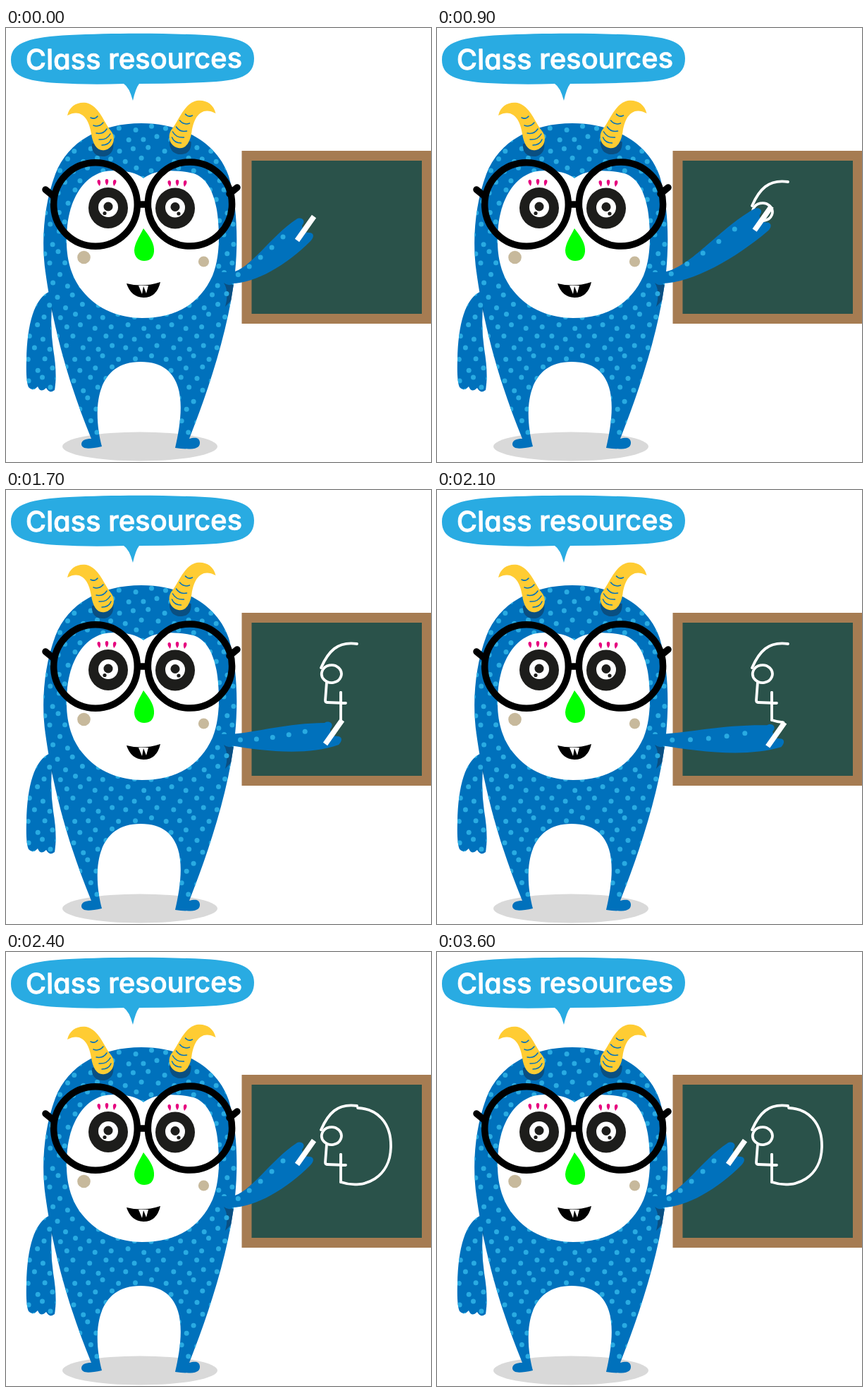
Animation, 603 px wide and 615 px high, one loop 5.6 s. Source, as an HTML page:

```html
<!DOCTYPE html>
<html lang="en">
<head>
<meta charset="utf-8">
<title>Class resources</title>
<style>
  html, body { margin: 0; width: 100%; height: 100%; overflow: hidden; background: #fff; }
  svg { display: block; width: 603px; height: 615px; }
  .fur { fill: #0071bc; }
  .dots { fill: #29abe2; }
  .shade { fill: #0a4f82; }
  .ink { fill: #1d1d1b; }
  .line { fill: none; stroke-linecap: round; stroke-linejoin: round; }
  .label { font: 500 39.8px Inter, "Open Sans", sans-serif; font-feature-settings: "cv11";
           fill: #fff; stroke: #fff; stroke-width: .9; stroke-linejoin: round; }
</style>
</head>
<body>
<svg viewBox="0 0 603 615">
  <defs>
    <path id="body" d="M192 135C135 135 88 160 70 207C53 252 50 304 56 346C65 411 83 489 121 582
      C113 582 107 584 107 590C108 597 117 597 136 593C124 548 123 473 191 473
      C261 473 251 548 240 595C257 597 276 599 275 587C274 580 268 580 260 582
      C288 511 317 424 325 346C330 297 327 246 316 210C300 163 251 135 192 135Z"/>
    <path id="sideArm" d="M63 373C40 382 30 420 29 470Q28 501 32 509Q38 516 45 508Q49 518 57 510
      Q62 519 69 513Q73 490 67 455Q62 420 66 386Z"/>
    <clipPath id="bodyClip"><use href="#body"/></clipPath>
    <clipPath id="furClip"><use href="#body"/><use href="#sideArm"/></clipPath>
    <g id="horn">
      <path class="shade" d="M122 164C121 177 128 183 140 182C150 180 154 171 152 160Z"/>
      <path fill="#fc3" d="M87 124C90 110 102 104 114 106C132 110 139 134 149 146C157 156 152 171 140 173
        C129 175 123 164 121 150C118 130 108 113 87 124Z"/>
      <path class="line" stroke="#0071bc" stroke-width="1.5"
        d="M120 127Q126 130 130 125M124 138Q132 141 138 134M128 149Q138 151 143 143M132 158Q143 159 148 150M136 166Q146 166 149 158"/>
    </g>
    <path id="lash" fill="#e6007e" d="M0 5C-3 1-3-4 0-4C3-4 3 1 0 5Z"/>
    <g id="eye">
      <ellipse class="ink" rx="28" ry="29"/>
      <circle cy="-1" r="14" fill="#fff"/>
      <circle cy="-2" r="6.5" class="ink"/>
    </g>
  </defs>

  <path fill="#29abe2" d="M7 45C7 19 37 13 90 10C150 7 225 7 282 10C330 13 352 20 352 43
    C352 68 333 75 280 77Q235 79 189 79Q184 85 180 103Q175 84 167 79Q120 81 72 78C27 75 7 68 7 45Z"/>
  <text class="label" x="28" y="59" transform="rotate(-.5 28 59)">Class resources</text>

  <path fill="#a67c52" d="M334.5 174H603V419H334.5Z"/>
  <path fill="#2a524a" d="M348.5 188H590V405H348.5Z"/>
  <g id="sketch" class="line" stroke="#fff" stroke-width="3.8">
    <path d="M498 218C470 214 457 229 447 252"/>
    <path d="M472 252A14 12.5 0 1 0 472.6 252.6"/>
    <path d="M455 272L453 298Q453 301 456 301"/>
    <path d="M456 301L482 302M475 302V287"/>
    <path d="M475 287V326"/>
    <path d="M475 326C510 338 545 318 546 277C547 240 525 222 499 221"/>
  </g>

  <ellipse cx="190" cy="593" rx="110" ry="20.5" fill="#d9d9d9"/>
  <use href="#body" class="fur"/>
  <g clip-path="url(#bodyClip)">
    <path class="shade" d="M62 383L65 394Q68 430 78 458L60 440ZM326 360Q317 368 309 361Q317 374 311 395L325 380Z"/>
  </g>
  <use href="#sideArm" class="fur"/>
  <g id="furDots" class="dots" clip-path="url(#furClip)"></g>

  <path fill="#fff" d="M195 213C181 201 151 200 137 204C109 212 91 243 87 280C84 310 86 344 108 372
    C130 400 163 411 193 411C241 411 275 391 293 351C304 324 303 290 300 264C296 232 283 208 261 205C236 200 210 201 195 213Z"/>
  <use href="#horn"/>
  <use href="#horn" transform="matrix(-1 0 0 1 384.5 -3)"/>
  <g id="lashes"></g>

  <g id="open">
    <use href="#eye" x="145" y="255"/>
    <use href="#eye" x="240" y="255.5"/>
    <circle cx="140" cy="262.5" r="2.6" class="ink"/>
    <circle cx="245" cy="263" r="2.6" class="ink"/>
  </g>
  <path id="closed" class="line" stroke="#1d1d1b" stroke-width="4"
    d="M115 256Q145 273 175 256M211 256Q241 273 272 256"/>

  <g class="line" stroke="#000" stroke-width="9.5">
    <circle cx="127" cy="250" r="59.3"/>
    <circle cx="261" cy="249.5" r="59.6"/>
    <path d="M188 250H201M56 229L67 238M328 226L317 235"/>
  </g>
  <path fill="#0f0" d="M195 284C205 297 211 306 210 317C209 326 204 330 196 330C188 330 182 324 182 315C183 304 188 298 195 284Z"/>
  <circle cx="110.5" cy="325" r="9.3" fill="#c7b99c"/>
  <circle cx="280.5" cy="331" r="7.6" fill="#c7b99c"/>
  <path d="M171 362Q195 368 219 360Q214 382 195 382Q177 381 171 362Z"/>
  <path fill="#fff" d="M188 365L193 377L195 366L199 376L202 365Z"/>

  <path id="arm" class="fur"/>
  <g id="armDots" class="dots"></g>
  <path id="chalk" fill="none" stroke="#fff" stroke-width="7.5"/>
</svg>
<script>
const $ = id => document.getElementById(id);
const LOOP = 5600;
const REST = { x: 413, y: 300 };
const beats = [500, 700, 900, 1300, 1500, 1700, 2100, 2200, 2300];  // the hand jumps
const DONE = 2400;
const BLINK = { first: 2300, every: 600, count: 3, length: 100 };

const strokes = [...$('sketch').children];
const skull = strokes.length - 1;
const lengths = strokes.map(s => s.getTotalLength());

const dot = (x, y) => `<circle cx="${x.toFixed(1)}" cy="${y.toFixed(1)}" r="3.5"/>`;
const range = n => [...Array(n).keys()];

// Staggered rows with a gentle wobble
$('furDots').innerHTML = range(30).flatMap(row => range(15).map(col => dot(
  32 + col * 21.5 + (row % 2) * 10.7 + 2.5 * Math.sin(row * 1.7 + col),
  142 + row * 14.8 + 3 * Math.sin(col * 2.1 + row * .6)))).join('');

const lashes = (x, y) => [-1, 0, 1].map(i =>
  `<use href="#lash" transform="translate(${x + 11 * i} ${y + Math.abs(i)}) rotate(${10 * i})"/>`).join('');
$('lashes').innerHTML = lashes(143, 218) + lashes(243, 219);

function armPath({ x, y }) {
  const at = (dx, dy) => `${x + dx} ${y + dy}`;
  const topX = x - 1, topY = y - 29, endX = x + 19, endY = y + 2;
  const top = `M306 346H320C${320 + .28 * (topX - 320)} 343 ` +
    `${topX - .4 * (topX - 320)} ${topY - .4 * (topY - 346) - 6} ${topX} ${topY}`;
  const hand = `C${at(5, -33)} ${at(14, -28)} ${at(7, -20)}L${at(9, -11)}L${at(17, -10)}` +
    `C${at(24, -10)} ${at(25, -4)} ${endX} ${endY}`;
  const bottom = `C${endX - .3 * (endX - 318)} ${endY + .3 * (362 - endY) + 16} ` +
    `${318 + .3 * (endX - 318)} ${362 + (y - 290) / 9} 318 362Q312 361 306 357Z`;
  return top + hand + bottom;
}

function poseArm(hand) {
  $('arm').setAttribute('d', armPath(hand));
  $('armDots').innerHTML = range(5).map(i => {
    const t = .08 + .175 * i;
    return dot(322 + (hand.x - 322) * t, 354 + (hand.y - 354) * t - 24 * t ** 1.7);
  }).join('');
  $('chalk').setAttribute('d', `M${hand.x} ${hand.y + 1}l24 -34`);
}

// How much of a stroke is drawn after the given beat; the skull speeds up
function drawn(i, beat, done) {
  if (done) return 1;
  if (i < skull) return i < beat ? 1 : 0;
  return .09 * Math.max(0, beat - skull) ** 2;
}

// The chalk follows the end of the newest line
function handAt(beat, done) {
  if (beat < 0 || done) return REST;
  const i = Math.min(Math.max(beat - 1, 0), skull);
  const tip = strokes[i].getPointAtLength(lengths[i] * drawn(i, beat, done));
  return { x: tip.x - 22, y: tip.y + 33 };
}

function show(time) {
  const beat = beats.filter(b => b <= time).length - 1;
  const done = time >= DONE;
  strokes.forEach((s, i) => {
    const part = drawn(i, beat, done);
    s.style.visibility = part ? 'visible' : 'hidden';
    s.style.strokeDasharray = part < 1 ? `${part * lengths[i]} 999` : 'none';
  });
  poseArm(handAt(beat, done));

  const since = time - BLINK.first;
  const shut = since >= 0 && since < BLINK.every * BLINK.count && since % BLINK.every < BLINK.length;
  $('open').style.visibility = shut ? 'hidden' : 'visible';
  $('closed').style.visibility = shut ? 'visible' : 'hidden';
}

const start = performance.now();
function frame() {
  show(Math.max(0, performance.now() - start) % LOOP);
  requestAnimationFrame(frame);
}
frame();
</script>
</body>
</html>
```
